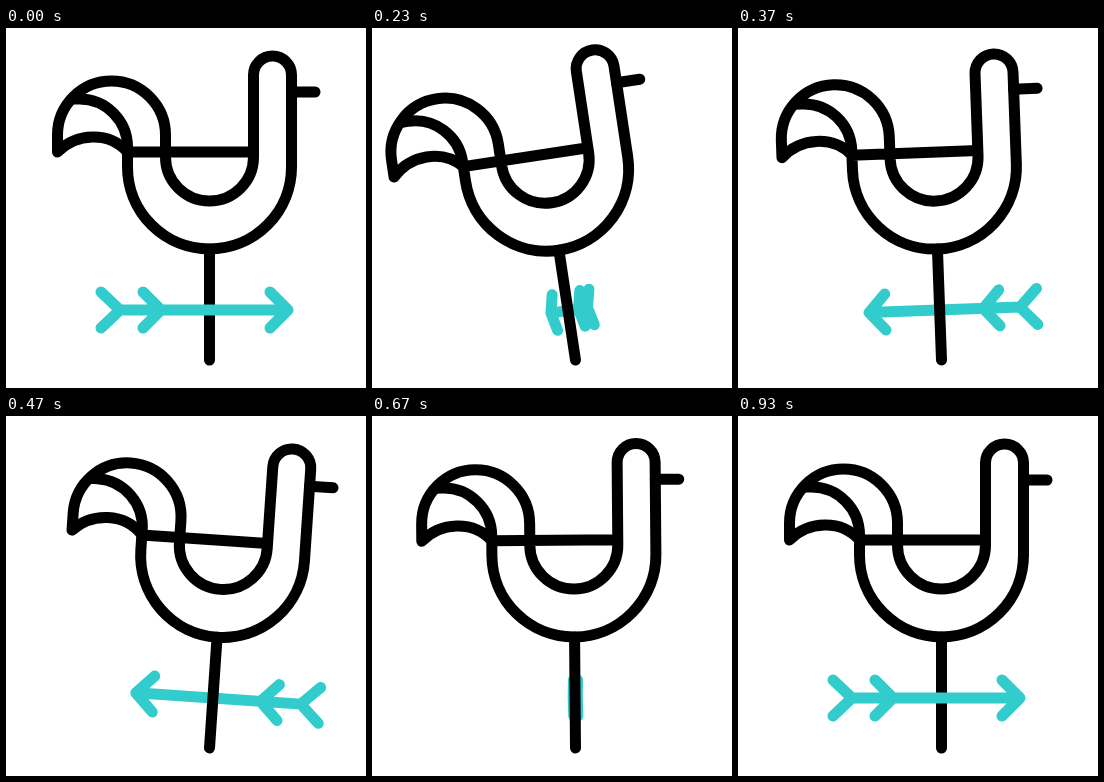
These frames come from a looping animation (360x360 px, 1.67 s). An HTML page:

```html
<!DOCTYPE html>
<html lang="en">
<head>
<meta charset="utf-8">
<title>Weather vane</title>
<style>
html, body { margin: 0; width: 100%; height: 100%; overflow: hidden; background: #fff; }
svg { display: block; width: 100%; height: 100%; }
path { fill: none; stroke: #000; stroke-width: 11; stroke-linecap: round; stroke-linejoin: round; }
#arrow { stroke: #33cccc; vector-effect: non-scaling-stroke; }
</style>
</head>
<body>
<svg viewBox="0 0 360 360">
  <g id="vane">
    <path d="M121.5 124V139A82 82 0 0 0 285.5 139V47A19 19 0 0 0 247.5 47V129A44 44 0 0 1 159.5 129V107A54 54 0 0 0 51.5 107V124C70 105 103 103 121.5 124H247.5"/>
    <path d="M66 71H73.5A48 48 0 0 1 121.5 119V124M285.5 64H309"/>
    <path id="pole" d="M203.5 221V332"/>
    <path id="arrow" d="M114 282H282M95 264L114 282L95 300M137 264L155 282L137 300M264 264L282 282L264 300"/>
  </g>
</svg>
<script>
const LOOP = 1670, STEP = 100 / 3, AXIS = 203.5;
const [vane, pole, arrow] = ['vane', 'pole', 'arrow'].map(id => document.getElementById(id));

// Keys are [step, degrees]
const lean = [[0, 0], [7, -8.6], [15, 4.4], [22.5, -2.1], [28, 0]];
const turn = [[0, 0], [1, 4], [4, 50], [7, 102.7], [11, 154], [13.2, 180], [18, 241], [23, 310], [27, 360]];

const linear = p => p;
const smooth = p => (1 - Math.cos(Math.PI * p)) / 2;

function valueAt(keys, k, ease) {
  const i = keys.findIndex(key => key[0] > k);
  if (i < 0) return keys[keys.length - 1][1];
  const [k0, v0] = keys[i - 1], [k1, v1] = keys[i];
  return v0 + (v1 - v0) * ease((k - k0) / (k1 - k0));
}

function draw(now) {
  const k = Math.floor((now % LOOP + 3.4) / STEP);
  const width = Math.cos(valueAt(turn, k, linear) * Math.PI / 180);
  vane.setAttribute('transform', `rotate(${valueAt(lean, k, smooth)} ${AXIS} 332)`);
  arrow.setAttribute('transform', `translate(${AXIS}) scale(${width} 1) translate(${-AXIS})`);
  // The arrow passes behind the pole while reversed
  const front = width > 0 ? arrow : pole;
  if (vane.lastElementChild !== front) vane.append(front);
}

let start;
function tick(now) {
  start ??= now;
  draw(now - start);
  requestAnimationFrame(tick);
}
draw(0);
requestAnimationFrame(tick);
</script>
</body>
</html>
```
